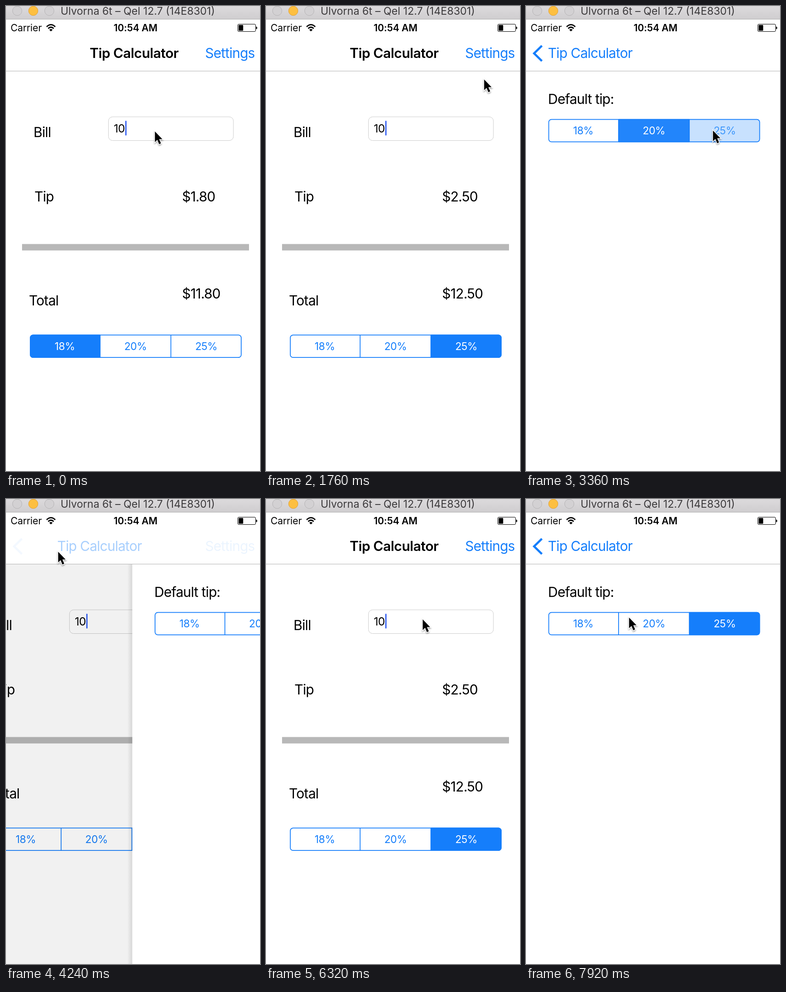
Recreate the animation shown at these times as an HTML page. Size 554 by 1011 pixels, loop 8 s.

```html
<!DOCTYPE html>
<html lang="en">
<head>
<meta charset="utf-8">
<title>Tip Calculator</title>
<style>
  html, body { margin: 0; width: 100%; height: 100%; overflow: hidden; background: #fff; }
  svg { display: block; width: 100vw; height: 100vh; }
  text { font: 29.7px Inter, Roboto, sans-serif; letter-spacing: -.026em; white-space: pre; }
  .blue { fill: #157efb; }
  .mid { text-anchor: middle; }
  text.bold { font-weight: 600; letter-spacing: -.016em; }
  text.small { font-size: 21px; letter-spacing: -.005em; }
  text.field { font-size: 24.5px; }
  text.window { font-size: 23px; letter-spacing: 0; fill: #3d3b3d; }
  .seg text { font-size: 22.7px; letter-spacing: -.02em; }
</style>
</head>
<body>
<svg viewBox="0 0 554 1011">
  <defs>
    <linearGradient id="chrome" x2="0" y2="1">
      <stop stop-color="#dcdadc"/><stop offset="1" stop-color="#cfcdcf"/>
    </linearGradient>
    <linearGradient id="edge">
      <stop stop-opacity="0"/><stop offset="1" stop-opacity=".11"/>
    </linearGradient>
    <clipPath id="pill"><rect x="52.2" y="714.6" width="461.6" height="50.5" rx="6.8"/></clipPath>
    <filter id="shadow" x="-50%" y="-50%" width="200%" height="200%">
      <feDropShadow dx="0" dy="2" stdDeviation="1.6" flood-opacity=".4"/>
    </filter>
  </defs>
  <rect width="554" height="1011" fill="#fff"/>

  <g id="mainPage">
    <text x="60" y="285">Bill</text>
    <rect x="223.5" y="241" width="272.5" height="51.5" rx="9" fill="#fff" stroke="#cdcdcd"/>
    <text class="field" x="235" y="275">10</text>
    <rect id="caret" x="260" y="249.5" width="3" height="32" rx="1" fill="#426bf2"/>
    <text x="62" y="425">Tip</text>
    <text id="tip" x="384" y="425"></text>
    <rect x="35" y="517.5" width="495" height="14" fill="#b8b8b8"/>
    <text x="50" y="651">Total</text>
    <text id="total" x="384" y="636"></text>
    <g id="mainSeg" class="seg"></g>
  </g>
  <rect id="dim" y="142" width="554" height="869"/>

  <g id="settingsPage">
    <rect id="edgeShade" x="-11" y="142" width="11" height="869" fill="url(#edge)"/>
    <rect y="142" width="559" height="869" fill="#fff"/>
    <text x="48" y="213">Default tip:</text>
    <g id="settingsSeg" class="seg" transform="translate(-3.4 -468.9)"></g>
  </g>

  <rect y="29" width="554" height="112" fill="#fff"/>
  <rect y="141" width="554" height="1" fill="#b2b2b2"/>
  <path id="chevron" d="M34.7 86.3L17.6 103L34.7 119.7" fill="none" stroke="#157efb" stroke-width="4.6"/>
  <text id="backLabel" class="blue" x="47.7" y="113">Tip Calculator</text>
  <text id="title" class="bold mid" x="279.5" y="113">Tip Calculator</text>
  <text id="settingsLink" class="blue" x="542.5" y="113" text-anchor="end">Settings</text>

  <text class="small" x="10" y="55">Carrier</text>
  <g fill="none" stroke="#000" stroke-width="2.7">
    <path d="M88.6 45.2Q98 36 107.4 45.2M92 49Q98 43 104 49"/>
    <path d="M98 55.2L94.3 51.6Q98 48.5 101.7 51.6Z" fill="#000" stroke="none"/>
  </g>
  <text class="bold small mid" x="282.5" y="55">10:54 AM</text>
  <rect x="505.5" y="39.5" width="39" height="16" rx="2.5" fill="none" stroke="#000"/>
  <rect x="507.3" y="41.3" width="10" height="12.4" rx="1"/>
  <path d="M545.5 44.5Q548 45 548 47.5T545.5 50.5Z"/>

  <rect width="554" height="29" fill="url(#chrome)"/>
  <rect y="28.3" width="554" height="1" fill="#b0aeb0"/>
  <circle cx="24.5" cy="10.5" r="10.2" fill="#d3d1d3" stroke="#b5b3b5"/>
  <circle cx="59.5" cy="10.5" r="10.2" fill="#fdbf40" stroke="#e0a136"/>
  <circle cx="94.5" cy="10.5" r="10.2" fill="#d3d1d3" stroke="#b5b3b5"/>
  <text class="window" x="119" y="19">Ulvorna 6t – Qel 12.7 (14E8301)</text>

  <path id="pointer" d="M.8 .8V24L6 19L10 28.4L14 26.6L10 17.6H17Z"
        stroke="#fff" stroke-width="2.6" paint-order="stroke" filter="url(#shadow)"/>
</svg>
<script>
  const LOOP = 8000, STEP = 80, WIDTH = 559, BILL = 10;
  const RATES = [18, 20, 25];
  const CELL = 154.3, SEG_LEFT = 51;
  const SLIDE_MS = 317, MOVE_MS = 640;
  const OPEN = 2080, BACK = 4083, REOPEN = 7320;

  const $ = id => document.getElementById(id);
  const clamp = v => Math.max(0, Math.min(1, v));
  const smooth = v => (v = clamp(v), v * v * (3 - 2 * v));
  const mix = (a, b, f) => a + (b - a) * f;
  const shift = (id, x, y = 0) => $(id).setAttribute('transform', `translate(${x} ${y})`);
  const fade = (id, v) => { $(id).style.opacity = clamp(v); };

  // Places the pointer visits, with the time it arrives at each.
  const VISITS = [
    { at: 0, x: 324, y: 272 },
    { at: 560, x: 283, y: 757 },
    { at: 1120, x: 428, y: 733 },
    { at: 1760, x: 475, y: 159 },
    { at: OPEN, x: 487, y: 106 },
    { at: 2880, x: 281, y: 268 },
    { at: 3280, x: 407, y: 270 },
    { at: 4000, x: 113, y: 114 },
    { at: 5120, x: 97, y: 588 },
    { at: 5440, x: 200, y: 770 },
    { at: 6080, x: 435, y: 714 },
    { at: 6320, x: 341, y: 261 },
    { at: 7280, x: 488, y: 106 },
    { at: 7920, x: 224, y: 257 }
  ];

  // Rests at a place, then eases so as to arrive at the next one on time.
  function pointerAt(t) {
    const next = VISITS.find(v => v.at > t) ?? VISITS.at(-1);
    const last = VISITS.findLast(v => v.at <= t);
    const span = Math.min(MOVE_MS, next.at - last.at) || 1;
    const f = smooth(1 - (next.at - t) / span);
    return [mix(last.x, next.x, f), mix(last.y, next.y, f)];
  }

  // Each tap moves the selection one cell on, after a short press.
  function selectionAt(t, ...taps) {
    const selected = taps.filter(tap => tap <= t).length;
    const pressed = taps[selected] - t <= STEP ? selected + 1 : -1;
    return { selected, pressed };
  }

  function buildSegments(group) {
    const left = i => SEG_LEFT + CELL * i;
    const cells = RATES.map((_, i) =>
      `<rect x="${left(i)}" y="714" width="${CELL}" height="52" fill="#157efb"/>`);
    const labels = RATES.map((rate, i) =>
      `<text class="mid" x="${left(i + .5)}" y="748">${rate}%</text>`);
    group.innerHTML = `<g clip-path="url(#pill)">${cells.join('')}</g>
      <path d="M${left(1)} 715V765M${left(2)} 715V765" stroke="#157efb" stroke-width="1.75"/>
      <rect x="53" y="715.4" width="460" height="48.8" rx="6" fill="none" stroke="#157efb" stroke-width="1.75"/>
      ${labels.join('')}`;
    const rects = group.querySelectorAll('g rect'), texts = group.querySelectorAll('text');
    return ({ selected, pressed }) => RATES.forEach((_, i) => {
      const on = i === selected, held = i === pressed;
      rects[i].style.opacity = on ? (pressed < 0 ? 1 : .94) : held ? .23 : 0;
      texts[i].style.fill = on ? '#fff' : held ? '#3d97fb' : '#157efb';
    });
  }

  const drawMainSeg = buildSegments($('mainSeg'));
  const drawSettingsSeg = buildSegments($('settingsSeg'));

  // 0 on the calculator, 1 on the settings page
  const slide = (t, start) => smooth((t - start) / SLIDE_MS);
  const pageAt = t => slide(t, OPEN) - slide(t, BACK) + slide(t, REOPEN);

  // Blinks once a second; the blink restarts when the calculator returns.
  const caretOn = t => (t < OPEN + SLIDE_MS ? t + 400 : t - 160) % 1000 < 500;

  function draw(now) {
    const t = Math.floor(now % LOOP / STEP) * STEP;

    const page = pageAt(t);
    shift('mainPage', -.3 * WIDTH * page);
    shift('settingsPage', WIDTH * (1 - page));
    fade('dim', .11 * page);
    fade('edgeShade', page > 0 && page < 1 ? 1 : 0);

    shift('title', -130 * page);
    shift('backLabel', 130 * (1 - page));
    fade('title', 1 - page / .5);
    fade('backLabel', (page - .22) / .78);
    fade('chevron', (page - .48) / .52);
    fade('settingsLink', 1 - page / .55);

    const choice = selectionAt(t, 640, 1200);
    const tip = BILL * RATES[choice.selected] / 100;
    $('tip').textContent = '$' + tip.toFixed(2);
    $('total').textContent = '$' + (BILL + tip).toFixed(2);
    drawMainSeg(choice);
    drawSettingsSeg(selectionAt(t, 2960, 3440));

    fade('caret', caretOn(t) ? 1 : 0);
    shift('pointer', ...pointerAt(t));
  }

  const start = performance.now();
  function tick() {
    draw(performance.now() - start);
    requestAnimationFrame(tick);
  }
  tick();
</script>
</body>
</html>
```
